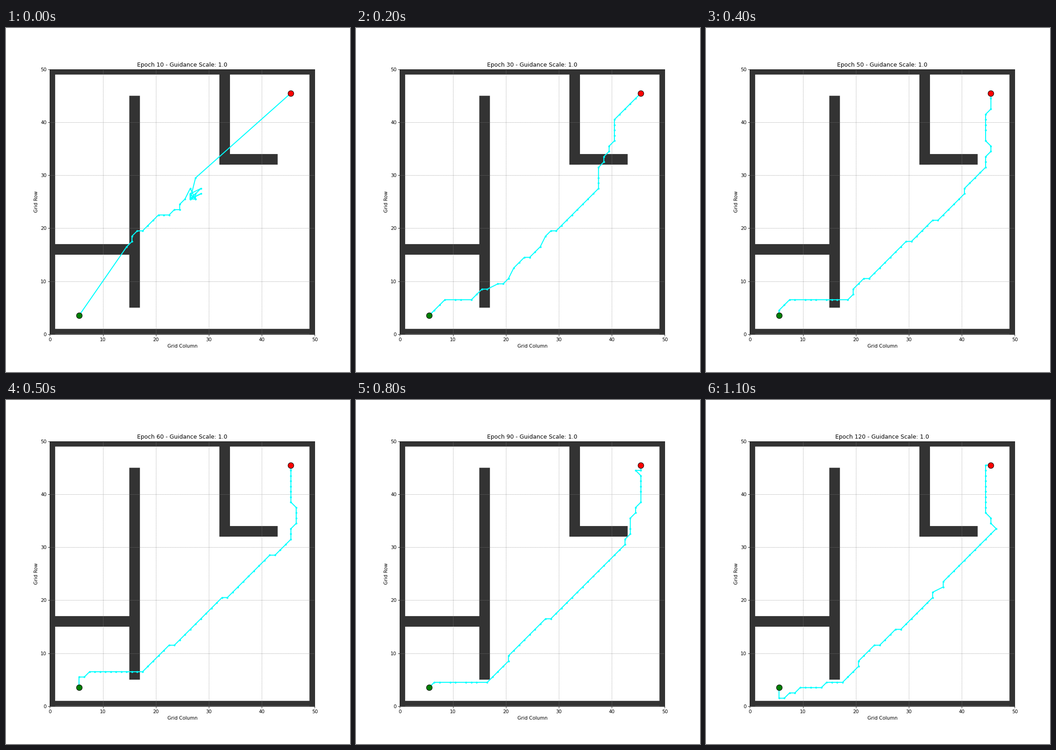
These frames come from a looping animation (748x748 px, 1200 ms). A matplotlib script:

```python
import matplotlib.pyplot as plt
import numpy as np
from matplotlib.animation import FuncAnimation
from matplotlib.patches import Rectangle

SIZE = 50
START, GOAL = (5, 3), (45, 45)
routes = {}


def walk(points, rng):
    """Step cell by cell along the key points, breaking ties at random."""
    cells = [np.array(points[:1])]
    for a, b in zip(points, points[1:]):
        a, b = np.array(a), np.array(b)
        n = max(abs(b - a))
        steps = a + np.outer(np.arange(1, n + 1) / n, b - a)
        steps[:-1] += rng.uniform(-0.2, 0.2, steps[:-1].shape)
        cells.append(np.rint(steps))
    return np.vstack(cells)


def tidy(cells):
    """Drop repeated neighbouring cells."""
    moved = np.any(np.diff(cells, axis=0) != 0, axis=1)
    return cells[np.r_[True, moved]]


def add_route(epoch, *points, knot=None, tail=()):
    """Walk the points, wander inside an optional knot, then go to the goal."""
    rng = np.random.default_rng(epoch)
    parts = [[START], walk(points, rng)]
    if knot:
        x, y, r = knot
        parts.append(np.rint(rng.uniform((x - r, y - r), (x + r, y + r), (16, 2))))
    parts.append([*tail, GOAL])
    routes[epoch] = tidy(np.vstack(parts))


def resample(cells, n=52):
    dist = np.r_[0, np.cumsum(np.hypot(*np.diff(cells, axis=0).T))]
    at = np.linspace(0, dist[-1], n)
    return np.column_stack([np.interp(at, dist, axis) for axis in cells.T])


def blend(a, b):
    """Midway route between two others, snapped to grid cells."""
    return tidy(np.rint((resample(a) + resample(b)) / 2))


add_route(10, (14, 16), (15, 18), (19, 21), (24, 23), (25, 25),
          knot=(26.7, 25.9, 1.4), tail=[(26, 25), (27, 29)])
add_route(20, (10, 7), (14, 7), (18, 11), (25, 19), (28, 23), (36, 28),
          (38, 32), (37, 40), knot=(37, 40, 1.3), tail=[(37, 40)])
add_route(40, (8, 6), (18, 6), (30, 17), (39, 25), (44, 33), (43, 39),
          (45, 43), GOAL)
add_route(60, (5, 5), (7, 6), (17, 6), (28, 16), (38, 25), (45, 31),
          (46, 36), (45, 40), GOAL)
add_route(80, (8, 4), (16, 4), (23, 12), (30, 18), (38, 25), (45, 33), GOAL)
add_route(100, (8, 5), (13, 5), (16, 4), (21, 9), (28, 16), (42, 30),
          (44, 33), (44, 40), (45, 43), knot=(44.5, 44.5, 0.9))
add_route(120, (5, 1), (10, 3), (17, 4), (21, 9), (30, 16), (40, 27),
          (46, 33), (44, 36), (44, 45))
for epoch in range(30, 120, 20):
    routes[epoch] = blend(routes[epoch - 10], routes[epoch + 10])

fig, ax = plt.subplots(figsize=(10, 10), dpi=74.8)
ax.set(xlim=(0, SIZE), ylim=(0, SIZE), aspect="equal",
       xticks=range(0, SIZE + 1, 10), yticks=range(0, SIZE + 1, 10),
       xlabel="Grid Column", ylabel="Grid Row")
ax.grid(color="gray", linestyle="--", linewidth=0.5)
title = ax.set_title("")


def wall(x, y, w, h):
    ax.add_patch(Rectangle((x, y), w, h, facecolor="#333333", linewidth=0,
                           snap=False))


for edge in (0, SIZE - 1):
    wall(edge, 0, 1, SIZE)
    wall(0, edge, SIZE, 1)
wall(15, 5, 2, 40)
wall(0, 15, 16, 2)
wall(32, 32, 2, 18)
wall(32, 32, 11, 2)

line, = ax.plot([], [], "o-", color="cyan", linewidth=2, markersize=3)
for (x, y), color in ((START, "green"), (GOAL, "red")):
    ax.plot(x + 0.5, y + 0.5, "o", color=color, markersize=12,
            markeredgecolor="black", zorder=5)


def update(i):
    epoch = 10 * (i + 1)
    line.set_data(*(routes[epoch].T + 0.5))
    title.set_text(f"Epoch {epoch} - Guidance Scale: 1.0")
    return line, title


anim = FuncAnimation(fig, update, frames=12, interval=100, repeat=True,
                     repeat_delay=0, blit=False)
plt.show()
```
